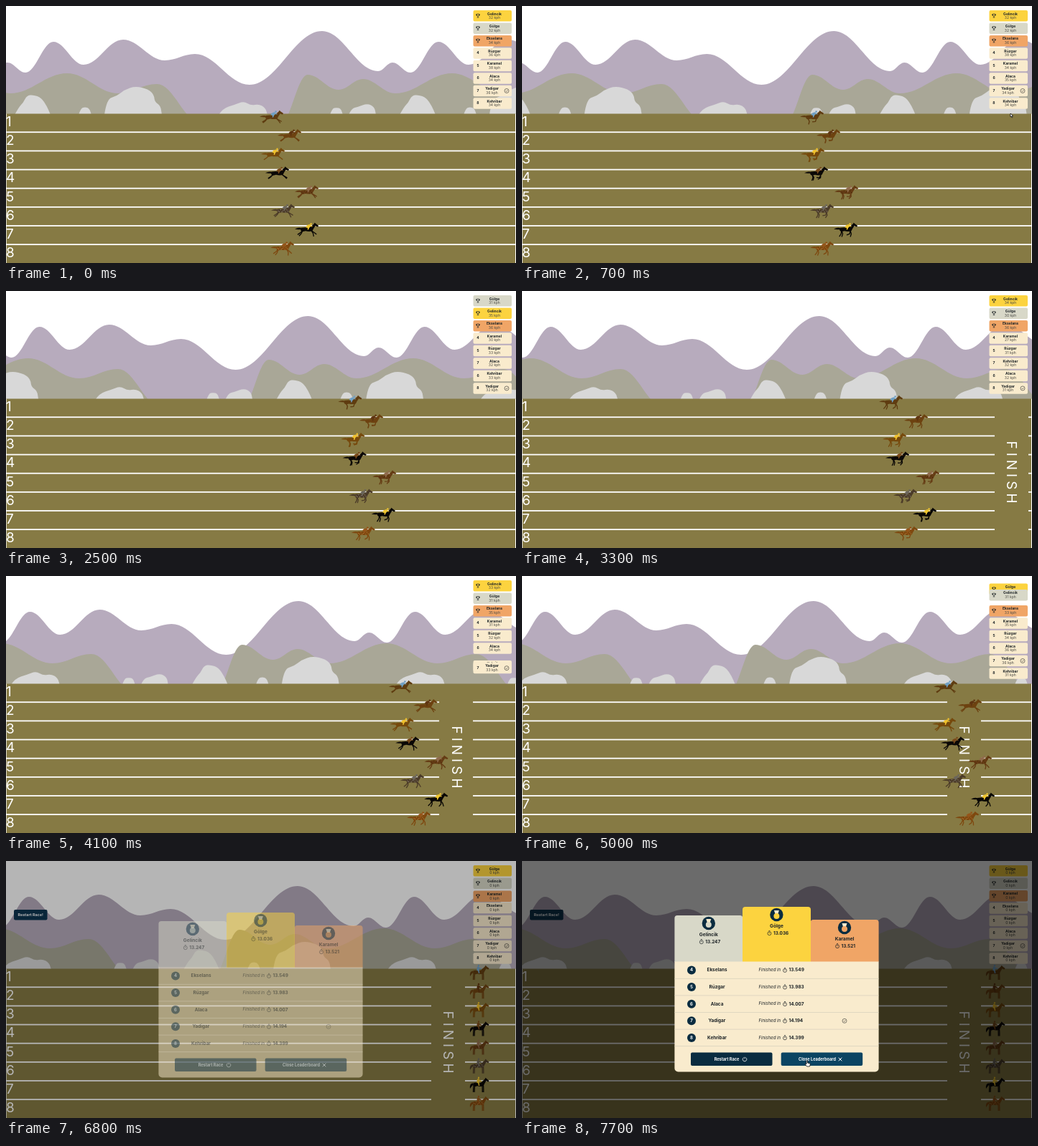
An HTML page with a canvas that plays this animation: 710x359 px, repeating every 8 s.

```html
<!DOCTYPE html>
<html lang="tr">
<head>
<meta charset="utf-8">
<title>Horse race</title>
<style>
html, body { margin: 0; width: 100%; height: 100%; overflow: hidden; background: #fff; }
canvas { display: block; }
</style>
</head>
<body>
<canvas id="c" width="710" height="359"></canvas>
<script>
const g = document.getElementById('c').getContext('2d');
const LOOP = 8000, TILE = 536, REST_X = 658, LANE = 26.15;
const NAVY = '#0a2c40', INK = '#1d2326', CREAM = '#f9ebcd';
const MEDALS = ['#fcd33f', '#d8d8c8', '#f0a566'];

// Scenery: extremes of each ridge, outlines of the rocks
const MOUNTAINS = [[27, 93], [66, 50], [108, 82], [163, 47], [221, 76], [263, 67], [339, 110], [440, 35], [518, 91], [538, 79]];
const HILLS = [[85, 94], [156, 122], [210, 109], [272, 164], [382, 164], [420, 96], [463, 117], [497, 102], [542, 122]];
const ROCKS = [
  [12, 152, 18, 141, 24, 135, 29, 125, 38, 124, 49, 128, 57, 140, 62, 152],
  [101, 152, 104, 143, 110, 141, 116, 143, 119, 152],
  [137, 152, 140, 130, 154, 126, 165, 117, 180, 112, 198, 116, 206, 124, 207, 134, 215, 139, 217, 152],
  [296, 152, 302, 143, 318, 138, 331, 133, 341, 139, 352, 137, 361, 142, 364, 152],
  [451, 152, 454, 143, 460, 142, 466, 143, 469, 152],
  [477, 152, 481, 143, 490, 141, 503, 136, 513, 141, 515, 152]
];

// Key times, and the share of the camera's way covered at each
const KEYS = [0, 700, 1800, 3300, 5000];
const CAMERA = [0, .167, .4, .766, 1.18];

// Horses by lane: coat, silks, spots, x at each key time
const HORSES = [
  ['#5f3c10', '#6f9fc4', '', [370, 404, 449, 514, 590]],
  ['#6d4210', '#5f3410', '', [395, 427, 474, 549, 624]],
  ['#76490c', '#efc02c', '', [372, 405, 452, 519, 588]],
  ['#0b0806', '#79491a', '', [378, 410, 453, 523, 600]],
  ['#653c14', '#8f6a4c', '#3b1d08', [419, 452, 494, 565, 638]],
  ['#4b3b28', '#6b655c', '#b3aca2', [386, 418, 460, 534, 602]],
  ['#080604', '#f0c62f', '', [419, 451, 495, 561, 642]],
  ['#7e480f', '#955419', '#d69a52', [385, 418, 465, 535, 620]]
];

// Runners on the board: name, lane, speed at each key time
const RUNNERS = [
  ['Gelincik', 4, [32, 32, 35, 34, 31]],
  ['Gölge', 6, [32, 32, 32, 30, 32]],
  ['Ekselans', 7, [34, 36, 36, 36, 33]],
  ['Rüzgar', 3, [36, 38, 35, 31, 34]],
  ['Karamel', 1, [38, 34, 32, 27, 35]],
  ['Alaca', 5, [34, 35, 32, 32, 36]],
  ['Yadigar', 0, [36, 34, 32, 31, 36]],
  ['Kehribar', 2, [34, 34, 34, 32, 31]]
];
const MINE = 6, SWAP = 450;
const ORDERS = [[-SWAP, '01234567'], [850, '01243567'], [1300, '10243576'], [2500, '01243756'],
  [3300, '01243576'], [3900, '01243567'], [4700, '10243567'], [6400, '10423567']];
const RESULTS = ['13.036', '13.247', '13.521', '13.549', '13.983', '14.007', '14.194', '14.399'];

const clamp = v => Math.max(0, Math.min(1, v));
const ease = v => { v = clamp(v); return v * v * (3 - 2 * v); };
const mix = (a, b, p) => a + (b - a) * p;
function keyed(vals, t) {
  let i = 0;
  while (i < KEYS.length - 2 && t > KEYS[i + 1]) i++;
  return mix(vals[i], vals[i + 1], clamp((t - KEYS[i]) / (KEYS[i + 1] - KEYS[i])));
}
const horseX = (lane, t) =>
  Math.min(REST_X, keyed(HORSES[lane][3], t) + Math.max(0, t - 5000) * .045);

function text(s, x, y, size, color = INK, style = '700', align = 'center') {
  g.font = `${style} ${size}px Inter, "Liberation Sans", sans-serif`;
  g.fillStyle = color;
  g.textAlign = align;
  g.textBaseline = 'middle';
  g.fillText(s, x, y);
}
function box(x, y, w, h, r, color) {
  g.fillStyle = color;
  g.beginPath();
  g.roundRect(x, y, w, h, r);
  g.fill();
}
function disc(x, y, r, color) {
  g.fillStyle = color;
  g.beginPath();
  g.arc(x, y, r, 0, 7);
  g.fill();
}
function stroke(d, x, y, color = INK, width = .8) {
  g.save();
  g.translate(x, y);
  g.strokeStyle = color;
  g.lineWidth = width;
  g.stroke(new Path2D(d));
  g.restore();
}
const check = (x, y) => stroke('M3 0A3 3 0 1 1 -3 0A3 3 0 1 1 3 0M-1.4 0L-.3 1.1L1.5 -1', x, y, '#4b4a44', .7);
const clock = (x, y) => stroke('M2.5 .4A2.5 2.5 0 1 1 -2.5 .4A2.5 2.5 0 1 1 2.5 .4M0 .4V-1M-1 -3.2H1', x, y, INK, .7);
const trophy = (x, y) => stroke('M-1.5 -2.4H1.5V-.4Q0 1.8 -1.5 -.4ZM-1.5 -1.8H-2.6Q-2.5 0 -1.2 0M1.5 -1.8H2.6Q2.5 0 1.2 0M0 .8V2.3M-1.3 2.4H1.3', x, y, INK, .7);

function ridge(points, shift, color) {
  g.fillStyle = color;
  g.beginPath();
  let px = -TILE - 200, py = 150;
  g.moveTo(px, py);
  for (let k = -1; k < 3; k++) for (const [a, y] of points) {
    const x = a + k * TILE - shift, h = (x - px) * .38;
    g.bezierCurveTo(px + h, py, x - h, y, x, y);
    px = x; py = y;
  }
  g.lineTo(px, 170);
  g.lineTo(-TILE - 200, 170);
  g.fill();
}
function rock(p, dx) {
  g.beginPath();
  g.moveTo(p[0] + dx, p[1]);
  for (let i = 2; i < p.length - 2; i += 2)
    g.quadraticCurveTo(p[i] + dx, p[i + 1], (p[i] + p[i + 2]) / 2 + dx, (p[i + 1] + p[i + 3]) / 2);
  g.lineTo(p.at(-2) + dx, p.at(-1));
  g.fill();
}
function scene(t) {
  const cam = Math.min(1, keyed(CAMERA, t));
  g.fillStyle = '#fff';
  g.fillRect(0, 0, 710, 359);
  ridge(MOUNTAINS, 34 * cam, '#b7abbd');
  ridge(HILLS, 95 * cam, '#a9a797');
  g.fillStyle = '#d8d8d8';
  for (let k = 0; k < 3; k++) for (const p of ROCKS) rock(p, k * TILE - 301 * cam);
  g.fillStyle = '#867a44';
  g.fillRect(0, 150.5, 710, 209);

  const gap = 592 + 282 * (1 - cam);
  g.fillStyle = '#fff';
  g.fillRect(0, 150.5, .7, 209);
  g.fillRect(709, 150.5, 1, 209);
  for (let i = 0; i < 8; i++) {
    const y = 149.2 + LANE * i;
    if (i) {
      g.fillRect(0, y, Math.min(709, gap), 1.8);
      if (gap + 47 < 709) g.fillRect(gap + 47, y, 662 - gap, 1.8);
    }
    text(i + 1, 0, y + 13, 19, '#fff', '400', 'left');
  }
  g.save();
  g.translate(gap + 23.2, 255.5);
  g.rotate(Math.PI / 2);
  g.letterSpacing = '5px';
  text('FINISH', 0, 0, 19, '#fff', '400');
  g.restore();
}

const BODY = new Path2D('M-8 -2Q-3 -2.8 3 -2L9.4 -7.2L10.8 -9.2L12.2 -7.8L16.2 -5L15 -3.5L11.6 -4.6Q9 -1 7.5 2.4Q3 3.6 -2 2.4L-6 3.4Q-10.5 2 -8 -2Z');
const TAIL = new Path2D('M-8 -1.6Q-12 -3 -17 -.2Q-12 .4 -8 .4Z');
const TAIL_REST = new Path2D('M-8 -1.6Q-13 -1 -12 6Q-10 3 -8 1Z');
const RIDER = new Path2D('M-1.6 -3Q-.6 -6 4 -6.8L6 -4.8L8 -4.2L7 -3.4L4.5 -4L3 -2L2 .6L.8 .6L1 -2Z');
const RIDER_REST = new Path2D('M-3 -2L-2.4 -7Q-.5 -8.6 1 -6.6L5 -4.4L4.4 -3.4L1 -4.4L1 -2L1.4 2L0 2L-1 -1.6Z');

function leg(x, angle, bend) {
  const kx = x + 4.4 * Math.sin(angle), ky = 2.2 + 4.4 * Math.cos(angle), a = angle - bend;
  g.moveTo(x, 1.8);
  g.lineTo(kx, ky);
  g.lineTo(kx + 4.4 * Math.sin(a), ky + 4.4 * Math.cos(a));
}
function horse(lane, t) {
  const [coat, silks, spots] = HORSES[lane], x = horseX(lane, t), still = x >= REST_X;
  const phase = t / 450 * 2 * Math.PI + lane * .2;
  g.save();
  g.translate(x, 155 + LANE * lane);
  g.fillStyle = g.strokeStyle = coat;
  g.lineWidth = 1.3;
  g.lineJoin = 'round';
  g.beginPath();
  for (const off of [0, .8]) {
    const c = Math.cos(phase - off), bend = .4 - .35 * c;
    if (still) { leg(-7 + 2 * off, -.08, -.05); leg(5 + 2 * off, .05, .05); }
    else { leg(-6, -.2 - .75 * c, bend); leg(6, .35 + .75 * c, bend * 1.6); }
  }
  g.stroke();
  g.fill(still ? TAIL_REST : TAIL);
  if (still) g.scale(.9, 1);
  g.fill(BODY);
  if (spots) for (let i = 0; i < 9; i++) disc(-7 + i * 1.7, .4 + 1.7 * Math.sin(i * 2.4), .5, spots);
  g.fillStyle = silks;
  g.fill(still ? RIDER_REST : RIDER);
  disc(still ? 0 : 5.6, still ? -9 : -7.4, 1.3, silks);
  g.restore();
}

function board(t) {
  let k = ORDERS.length - 1;
  while (ORDERS[k][0] > t) k--;
  const [start, now] = ORDERS[k], before = ORDERS[Math.max(0, k - 1)][1];
  const p = ease((t - start) / SWAP);
  for (let id = 7; id >= 0; id--) {
    const [name, lane, speeds] = RUNNERS[id], rank = now.indexOf(id);
    const y = 6 + 17.45 * mix(before.indexOf(id), rank, p);
    const kph = horseX(lane, t) >= REST_X ? 0 : Math.round(keyed(speeds, t));
    const cx = id === MINE ? 676.5 : 680;
    box(650.5, y, 53.5, 15.5, 2, MEDALS[rank] || CREAM);
    if (rank < 3) trophy(657, y + 7.6); else text(rank + 1, 657, y + 7.6, 5);
    text(name, cx, y + 5, 5);
    text(kph + ' kph', cx, y + 10.6, 5, '#4a4a44', '400');
    if (id === MINE) check(697, y + 7.8);
  }
}

function podium(rank, x, y, color) {
  const cx = x + 47.4, id = ORDERS.at(-1)[1][rank];
  box(x, y, 95, 141 - y, [4, 4, 0, 0], color);
  disc(cx, y + 11, 9.2, NAVY);
  g.fillStyle = CREAM;
  g.fill(new Path2D(`M${cx - 3.5} ${y + 5}h7l-1.6 5h-3.8z`));
  disc(cx, y + 13, 4, color);
  text(RUNNERS[id][0], cx, y + 27.3, 6.6);
  clock(cx - 10, y + 36.8);
  text(RESULTS[rank], cx - 4.5, y + 36.8, 6.4, INK, '700', 'left');
}
function modal(t) {
  podium(1, 212.4, 76, MEDALS[1]);
  podium(2, 401.6, 82, MEDALS[2]);
  podium(0, 307, 64, MEDALS[0]);
  box(212.4, 140.5, 284.2, 154, [0, 0, 5, 5], CREAM);
  for (let rank = 3; rank < 8; rank++) {
    const y = 152.5 + 23.6 * (rank - 3), id = +ORDERS.at(-1)[1][rank];
    disc(236, y, 6, NAVY);
    text(rank + 1, 236, y + .2, 6, '#fff');
    text(RUNNERS[id][0], 271.5, y, 6.4);
    text('Finished in', 329.5, y, 6, INK, 'italic 400', 'left');
    clock(366, y);
    text(RESULTS[rank], 371.5, y, 6.4, INK, '700', 'left');
    if (id === MINE) check(449, y);
    g.fillStyle = '#d9d2bd';
    g.fillRect(212.4, y + 11.4, 284.2, .8);
  }
  box(235, 267.5, 113.5, 18.5, 2, NAVY);
  box(360.7, 267.5, 113.5, 18.5, 2, t >= 7500 ? '#0b4462' : NAVY);
  text('Restart Race', 285, 277, 5.6, '#fff');
  text('Close Leaderboard', 411, 277, 5.6, '#fff');
  stroke('M1.4 -2.4A2.8 2.8 0 1 1 -1.4 -2.4M0 -3.2V-.8', 310, 277, '#fff');
  stroke('M-2.3 -2.3L2.3 2.3M2.3 -2.3L-2.3 2.3', 443, 277, '#fff', 1);
}

function pointer(d, x, y) {
  g.save();
  g.translate(x, y);
  const p = new Path2D(d);
  g.fillStyle = '#fff';
  g.strokeStyle = '#111';
  g.lineWidth = .8;
  g.fill(p);
  g.stroke(p);
  g.restore();
}
const ARROW = 'M-1 -2L-1 3L.2 2L1.2 4L2 3.5L1.2 1.6L2.6 1.4Z';
const HAND = 'M-1.5 -4Q-.6 -5 0 -4V-1L3 -.2Q4 .2 3.6 2L3 4H-1L-3.4 .8Q-3 -.3 -1.5 .8Z';

function draw(t) {
  scene(t);
  board(t);
  for (let i = 0; i < 8; i++) horse(i, t);
  if (t >= 500 && t < 2300) {
    const p = (t - 700) / 1100;
    pointer(ARROW, mix(681, 699, p), mix(152, 253, p));
  }
  if (t < 6700) return;
  box(11, 68, 46.5, 14.5, 2, '#0d3550');
  text('Restart Race!', 34.2, 75.3, 5.4, '#fff');
  const p = ease((t - 6600) / 400);
  g.fillStyle = `rgba(0,0,0,${.58 * p})`;
  g.fillRect(0, 0, 710, 359);
  g.save();
  g.globalAlpha = p;
  g.translate(0, 16 * (1 - p));
  modal(t);
  g.restore();
  if (t >= 7200) {
    const q = ease((t - 7200) / 400);
    pointer(t >= 7500 ? HAND : ARROW, mix(440, 397.5, q), mix(322, 283, q));
  }
}

// The picture advances ten times a second, with a few longer holds
const HOLDS = [[4300, 4600], [6800, 7000], [7000, 7200], [7700, 8000]];
function frame() {
  let t = Math.floor(performance.now() % LOOP / 100) * 100;
  for (const [a, b] of HOLDS) if (t >= a && t < b) { t = a; break; }
  draw(t);
  requestAnimationFrame(frame);
}
frame();
</script>
</body>
</html>
```
